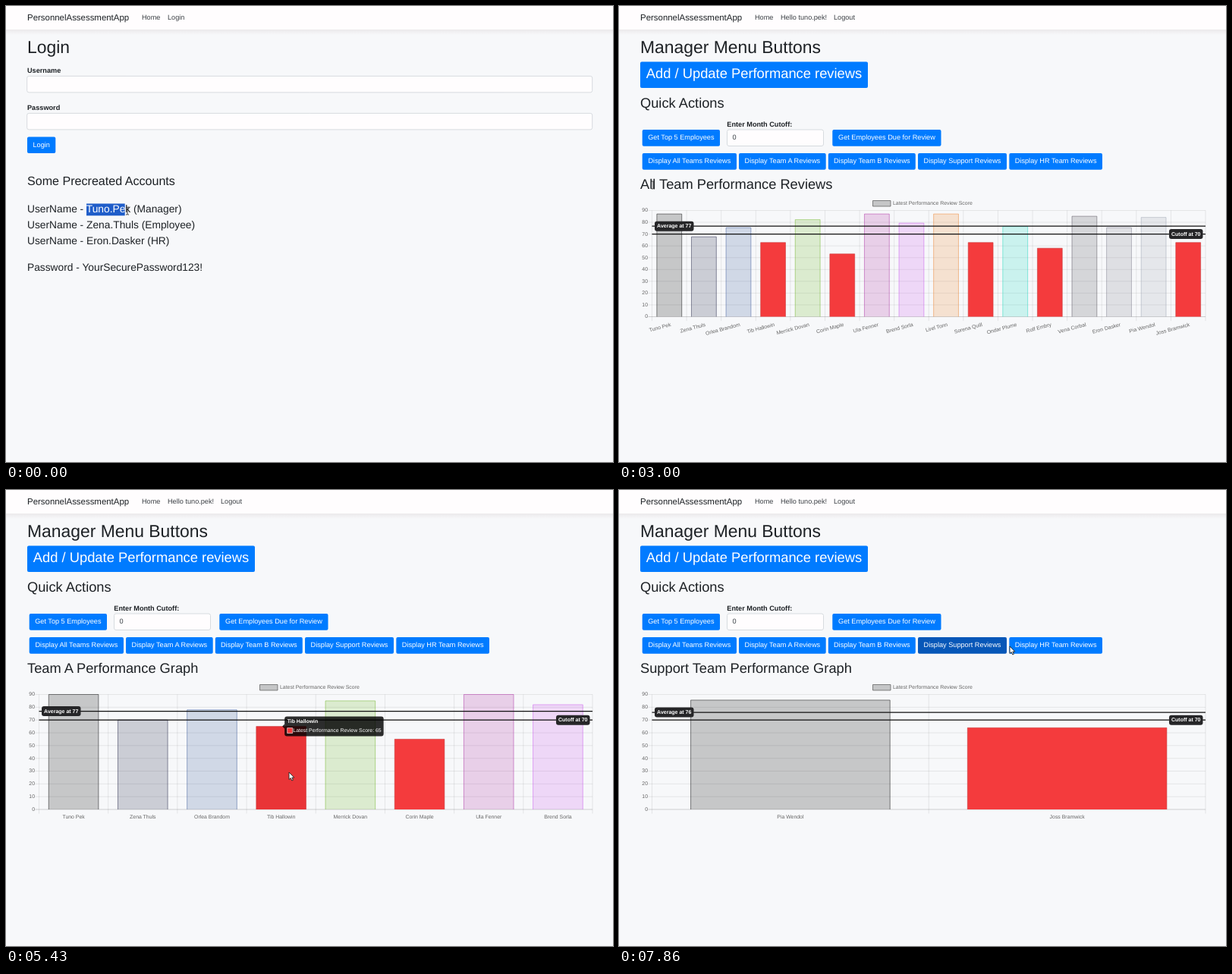
Animation of 800 by 601 pixels, one loop 8000 ms. Source, as an HTML page with a canvas:

```html
<!DOCTYPE html>
<html lang="en">
<head>
<meta charset="utf-8">
<title>Performance reviews</title>
<style>
  html, body { margin: 0; width: 100%; height: 100%; overflow: hidden; background: #f7f8fa; }
  canvas { display: block; }
</style>
</head>
<body>
<canvas id="stage" width="800" height="601"></canvas>
<script>
const ctx = document.getElementById('stage').getContext('2d');
const LOOP = 8000, FPS = 7;
const BLUE = '#007bff', INK = '#1d2125', RED = '#f43b3d';
const LOGIN_AT = 2426, TEAM_AT = 4352, SUPPORT_AT = 7214;
const SMALL = 9.16, ROW = 13.78, H4 = 16.08, H3 = 18.28, H2 = 22.9, CHART = 6.92;

const people = [
  ['Tuno Pek', 90], ['Zena Thuls', 70], ['Orlea Brandom', 78], ['Tib Hallowin', 65],
  ['Merrick Dovan', 85], ['Corin Maple', 55], ['Ula Fenner', 90], ['Brend Sorla', 82],
  ['Lirel Tonn', 90], ['Sorena Quill', 65], ['Ondar Plume', 79], ['Rolf Embry', 60],
  ['Vena Corbal', 88], ['Eron Dasker', 78], ['Pia Wendol', 87], ['Joss Bramwick', 65]
].map(([name, score]) => ({ name, score }));
const palette = ['#000000', '#1c1e41', '#355596', RED, '#6cb423', RED, '#a828a0', '#c650eb',
  '#e98228', RED, '#17d7be', RED, '#4e4b55', '#7b7887', '#99a0af', RED];

const views = [
  { start: LOGIN_AT, title: 'All Team Performance Reviews', staff: people, bottom: 409.5, tilted: true },
  { start: TEAM_AT, title: 'Team A Performance Graph', staff: people.slice(0, 8), bottom: 421 },
  { start: SUPPORT_AT, title: 'Support Team Performance Graph', staff: people.slice(14), bottom: 421 }
];
const LEFT = 43.5, RIGHT = 773, TOP = 269.5;

// time, x, y, pointer shape from then on
const cursorPath = [
  [0, 160, 270, 'beam'], [140, 160, 270, 'beam'], [290, 167, 270, 'beam'], [650, 112, 103, 'beam'],
  [850, 112, 105, 'beam'], [1286, 104, 346, 'beam'], [1650, 262, 346, 'beam'], [1800, 262, 346, 'beam'],
  [2070, 110, 153, 'beam'], [2170, 106, 155, 'beam'], [2330, 46, 184, 'hand'], [2500, 46, 186, 'arrow'],
  [2850, 45, 236, 'beam'], [3430, 45, 236, 'arrow'], [4200, 240, 207, 'hand'], [4500, 240, 207, 'arrow'],
  [5000, 370, 365, 'arrow'], [5420, 373, 372, 'arrow'], [5700, 375, 372, 'arrow'], [5850, 454, 360, 'arrow'],
  [6050, 545, 365, 'arrow'], [6250, 636, 350, 'arrow'], [6450, 727, 345, 'arrow'], [6640, 690, 310, 'arrow'],
  [6720, 470, 295, 'arrow'], [6855, 132, 271, 'arrow'], [7140, 455, 205, 'hand'], [7500, 465, 206, 'hand'],
  [7850, 515, 206, 'arrow'], [8001, 515, 206, 'arrow']
];

// time, index of the hovered bar
const hovers = [[4950, 3], [5760, 4], [5950, 5], [6150, 6], [6350, 7], [6717, 4]];
const HOVER_END = 6780;

const clamp = v => Math.max(0, Math.min(1, v));
const lerp = (a, b, p) => a + (b - a) * p;
const smooth = p => p * p * (3 - 2 * p);
const easeOutQuart = p => 1 - (1 - clamp(p)) ** 4;
const lastBefore = (list, t) => list.findLastIndex(item => item[0] <= t);

function text(str, x, y, size, { color = INK, bold = false, align = 'left' } = {}) {
  ctx.font = `${bold ? 'bold ' : ''}${size}px "Liberation Sans", Arial, sans-serif`;
  ctx.textAlign = align;
  ctx.fillStyle = color;
  ctx.fillText(str, x, y);
}

function box(x, y, w, h, fill, { radius = 2.5, stroke, line = 1 } = {}) {
  ctx.beginPath();
  ctx.roundRect(x, y, w, h, radius);
  ctx.fillStyle = fill;
  ctx.fill();
  if (!stroke) return;
  ctx.strokeStyle = stroke;
  ctx.lineWidth = line;
  ctx.stroke();
}

function segment(x1, y1, x2, y2, color, width) {
  ctx.beginPath();
  ctx.moveTo(x1, y1);
  ctx.lineTo(x2, y2);
  ctx.strokeStyle = color;
  ctx.lineWidth = width;
  ctx.stroke();
}

function button(label, x, y, w, h = 21.7, size = SMALL, fill = BLUE) {
  box(x, y, w, h, fill, { radius: 2 });
  text(label, x + w / 2, y + h / 2 - (size > 12 ? 1.2 : 0), size, { color: '#fff', align: 'center' });
}

function field(x, y, w, value, focused) {
  if (focused) box(x - 1.2, y - 1.2, w + 2.4, 23.9, '#d9e8fd', { radius: 3.5 });
  box(x, y, w, 21.5, '#fffdfe', { stroke: focused ? '#a3c9fa' : '#d3d7dc', line: 0.9 });
  text(value, x + 7, y + 10.5, SMALL, { color: '#3c4248' });
}

function navbar(links) {
  const shade = ctx.createLinearGradient(0, 31, 0, 38);
  shade.addColorStop(0, '#ebe9eb');
  shade.addColorStop(1, '#f7f8fa');
  ctx.fillStyle = shade;
  ctx.fillRect(0, 31, 800, 7);
  ctx.fillStyle = '#fffdfe';
  ctx.fillRect(0, 0, 800, 31);
  text('PersonnelAssessmentApp', 28, 15.7, 11.45);
  for (const [label, x] of links) text(label, x, 15.7, SMALL, { color: '#3c4045' });
}

// Text whose middle part is highlighted up to the given share
function selectable(prefix, part, suffix, y, amount) {
  text(prefix + part + suffix, 28, y, ROW);
  if (!amount) return;
  const x = 28 + ctx.measureText(prefix).width;
  const w = ctx.measureText(part).width * amount;
  ctx.save();
  ctx.beginPath();
  ctx.rect(x, y - 8, w, 16.3);
  ctx.clip();
  ctx.fillStyle = '#1f5dc9';
  ctx.fillRect(x, y - 8, w, 16.3);
  text(prefix + part, 28, y, ROW, { color: '#fff' });
  ctx.restore();
}

function loginPage(t) {
  navbar([['Home', 179], ['Login', 213]]);
  text('Login', 28, 56, H2);
  text('Username', 28, 85, SMALL, { bold: true });
  field(27.7, 92.4, 745, t >= 850 ? 'Tuno.Pek' : '', t >= 700 && t < 1400);
  text('Password', 28, 134.2, SMALL, { bold: true });
  field(27.7, 141.4, 745, t >= 2200 ? '•'.repeat(22) : '', t >= 2100);
  button('Login', 28, 172.4, 37.3);

  text('Some Precreated Accounts', 28, 232, H4);
  const nameShare = t >= 700 ? 0 : t < 140 ? 0.87 : 1;
  const passShare = t >= 2100 ? 0 : smooth(clamp((t - 1290) / 360));
  selectable('UserName - ', 'Tuno.Pek', ' (Manager)', 268.3, nameShare);
  selectable('UserName - ', 'Zena.Thuls', ' (Employee)', 289.2, 0);
  selectable('UserName - ', 'Eron.Dasker', ' (HR)', 310.2, 0);
  selectable('Password - ', 'YourSecurePassword123!', '', 345.3, passShare);
}

function tag(label, x, y, w) {
  box(x, y - 6.5, w, 13, '#262628', { radius: 3 });
  text(label, x + w / 2, y, 7, { color: '#fff', bold: true, align: 'center' });
}

function chart(view, t) {
  const { staff, bottom, tilted } = view;
  const slot = (RIGHT - LEFT) / staff.length;
  const toY = v => bottom - v * (bottom - TOP) / 90;
  const centre = i => LEFT + slot * (i + 0.5);
  const growth = easeOutQuart((t - view.start) / 1000);
  const hover = lastBefore(hovers, t);
  const hovered = hover >= 0 && t < HOVER_END ? hovers[hover][1] : -1;
  const label = { color: '#666' };

  box(334.5, 256.5, 23.5, 7.5, '#c5c6c7', { radius: 0, stroke: '#666', line: 0.8 });
  text('Latest Performance Review Score', 361, 260, CHART, label);

  for (let v = 0; v <= 90; v += 10) {
    segment(LEFT - 5, toY(v), RIGHT, toY(v), v ? 'rgba(0,0,0,.1)' : 'rgba(0,0,0,.22)', 0.8);
    text(v, 38, toY(v), CHART, { ...label, align: 'right' });
  }
  for (let i = 0; i <= staff.length; i++) {
    const x = LEFT + slot * i;
    segment(x, TOP, x, bottom + 5.5, 'rgba(0,0,0,.1)', 0.8);
  }

  staff.forEach(({ name, score }, i) => {
    const low = score < 70;
    const color = low ? RED : palette[i];
    const y = toY(score * growth), x = centre(i) - slot * 0.36, w = slot * 0.72;
    ctx.fillStyle = !low ? color + '33' : i === hovered && view === views[1] ? '#e93437' : RED;
    ctx.fillRect(x, y, w, bottom - y);
    ctx.beginPath();
    ctx.moveTo(x, bottom);
    ctx.lineTo(x, y);
    ctx.lineTo(x + w, y);
    ctx.lineTo(x + w, bottom);
    ctx.strokeStyle = low ? '#c93a3c' : color + 'cc';
    ctx.lineWidth = 0.6;
    ctx.stroke();

    ctx.save();
    ctx.translate(centre(i) + (tilted ? 2 : 0), tilted ? 420 : 431);
    if (tilted) ctx.rotate(-Math.PI / 12);
    text(name, 0, 0, CHART, { ...label, align: tilted ? 'right' : 'center' });
    ctx.restore();
  });

  const average = staff.reduce((sum, p) => sum + p.score, 0) / staff.length;
  for (const v of [average, 70]) segment(LEFT, toY(v), RIGHT, toY(v), '#111', 1.3);
  tag(`Average at ${Math.round(average)}`, 47, toY(average), 51.5);
  tag('Cutoff at 70', 725, toY(70), 44.5);

  if (view === views[1] && hover >= 0) tooltip(staff, hover, t, centre, toY);
}

function tooltip(staff, hover, t, centre, toY) {
  const W = 130.5, H = 26;
  const place = i => ({
    x: centre(i) < 408 ? centre(i) + 4.5 : centre(i) - 4.5 - W,
    y: toY(staff[i].score)
  });
  const [since, index] = hovers[hover];
  const p = easeOutQuart((t - since) / 400);
  const to = place(index), from = hover ? place(hovers[hover - 1][1]) : to;
  const x = lerp(from.x, to.x, p), y = lerp(from.y, to.y, p);
  const fade = clamp(1 - (t - HOVER_END) / 160);
  if (!fade) return;
  const person = staff[index];
  const caretLeft = centre(index) < 408;
  const edge = caretLeft ? x : x + W, tip = caretLeft ? -3 : 3;

  ctx.save();
  ctx.globalAlpha = fade * (hover ? 1 : p);
  box(x, y - H / 2, W, H, 'rgba(0,0,0,.82)', { radius: 3 });
  ctx.beginPath();
  ctx.moveTo(edge, y - 3);
  ctx.lineTo(edge + tip, y);
  ctx.lineTo(edge, y + 3);
  ctx.fill();
  ctx.globalAlpha *= fade ** 3;
  text(person.name, x + 3.5, y - 6.5, CHART, { color: '#fff', bold: true });
  box(x + 3.5, y + 2, 7, 7, person.score < 70 ? RED : palette[index], { radius: 0, stroke: '#fff', line: 0.6 });
  text(`Latest Performance Review Score: ${person.score}`, x + 11.2, y + 5.5, CHART, { color: '#fff' });
  ctx.restore();
}

function dashboard(t) {
  navbar([['Home', 179], ['Hello tuno.pek!', 213], ['Logout', 283]]);
  text('Manager Menu Buttons', 28, 56, H2);
  button('Add / Update Performance reviews', 28, 73.5, 300, 34.5, 18.35);
  text('Quick Actions', 28, 128.8, H3);
  button('Get Top 5 Employees', 30.7, 163, 102.3);
  text('Enter Month Cutoff:', 142.3, 156, SMALL, { bold: true });
  field(142.5, 163, 127, '0', false);
  button('Get Employees Due for Review', 281.3, 163, 143.2);

  const pressed = t >= SUPPORT_AT - 80;
  button('Display All Teams Reviews', 30.7, 194, 124.3);
  button('Display Team A Reviews', 158, 194, 114.7);
  button('Display Team B Reviews', 275.8, 194, 115);
  button('Display Support Reviews', 394, 194, 117, 21.7, SMALL, pressed ? '#0757b8' : BLUE);
  button('Display HR Team Reviews', 514.3, 194, 122.7);

  const view = views.findLast(v => t >= v.start);
  text(view.title, 28, 236.4, H3);
  chart(view, t);
}

const pointers = {
  arrow: new Path2D('M0 0V9.5L2.2 7.6L3.8 11L5.4 10.3L3.9 7H6.8Z'),
  hand: new Path2D('M-1 1Q0-1 1 1V5L5 6Q6 6 6 8L5 13H0L-3.5 8.5Q-3.5 7-1 8Z'),
  beam: new Path2D('M-2-5H-.5L0-4.5L.5-5H2M0-4.5V4.5M-2 5H-.5L0 4.5L.5 5H2')
};

function pointer(t) {
  const i = lastBefore(cursorPath, t);
  const [t0, x0, y0, shape] = cursorPath[i], [t1, x1, y1] = cursorPath[i + 1];
  const p = smooth((t - t0) / (t1 - t0));
  ctx.save();
  ctx.translate(lerp(x0, x1, p), lerp(y0, y1, p));
  ctx.strokeStyle = '#222';
  ctx.lineWidth = 0.9;
  if (shape !== 'beam') {
    ctx.fillStyle = '#fff';
    ctx.fill(pointers[shape]);
  }
  ctx.stroke(pointers[shape]);
  ctx.restore();
}

function draw(now) {
  const t = Math.floor((now % LOOP) / 1000 * FPS + 0.05) * 1000 / FPS % LOOP;
  ctx.textBaseline = 'middle';
  ctx.textRendering = 'geometricPrecision';
  ctx.fillStyle = '#f7f8fa';
  ctx.fillRect(0, 0, 800, 601);
  (t < LOGIN_AT ? loginPage : dashboard)(t);
  pointer(t);
}

const begin = performance.now();
function tick() {
  draw(performance.now() - begin);
  requestAnimationFrame(tick);
}
tick();
</script>
</body>
</html>
```
